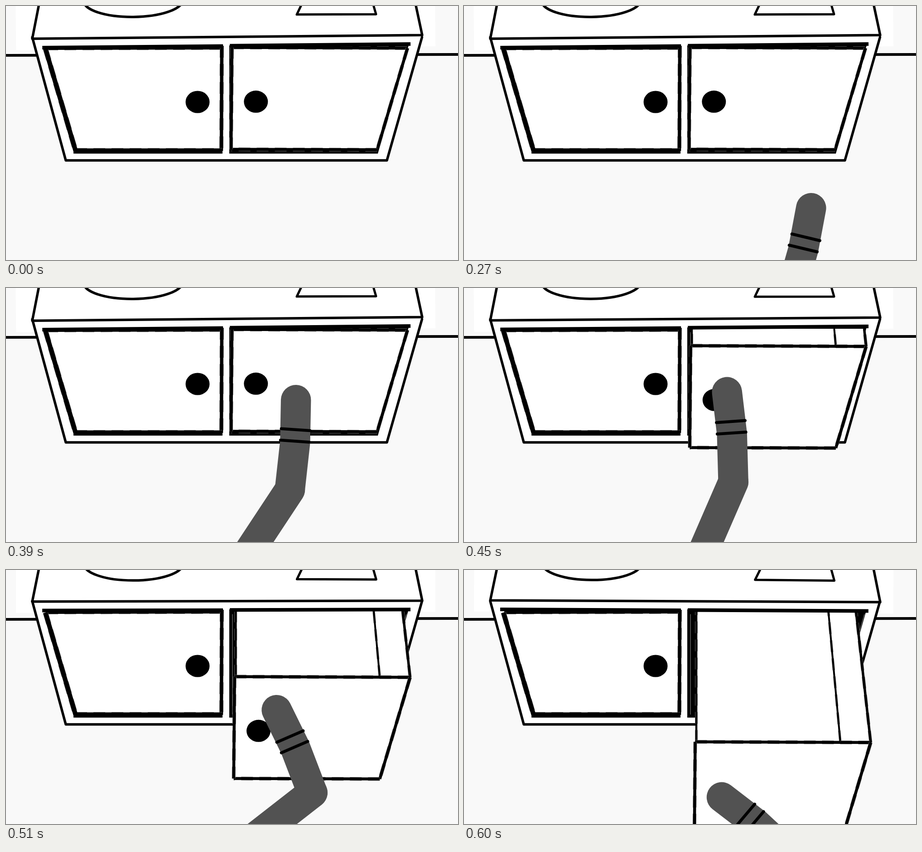
Write an HTML page with a canvas that moves like this. It is 998 px wide and 561 px high and loops after 1050 ms.

```html
<!DOCTYPE html>
<html lang="en">
<head>
<meta charset="utf-8">
<title>Opening a drawer</title>
<style>
html, body { margin: 0; width: 100%; height: 100%; overflow: hidden; background: #f9f9f9; }
canvas { display: block; }
</style>
</head>
<body>
<canvas id="stage" width="998" height="561"></canvas>
<script>
const ctx = document.getElementById('stage').getContext('2d');
const LOOP = 1050, STEP = 30, REACH = 210, GRAB = 420, END = 600;
const UPPER = 210, FORE = 199;

const rad = deg => deg * Math.PI / 180;
const mix = (a, b, s) => a + (b - a) * s;
const part = (t, from, to) => Math.min(1, Math.max(0, (t - from) / (to - from)));
// Soft start and stop, between linear and smoothstep
const ease = s => mix(s, s * s * (3 - 2 * s), 0.45);

// The arm reaches evenly, then swings back just after the drawer starts
function pose(t) {
  const reach = part(t, REACH, GRAB);
  const swing = lag => ease(part(t, GRAB + lag, END));
  return {
    upper: mix(mix(36, -72, reach), 2.6, swing(12)),
    tilt: mix(mix(18.2, 1.5, reach), -49.7, swing(4)),
    pull: swing(0)
  };
}

function trace(points) {
  ctx.beginPath();
  points.forEach(p => ctx.lineTo(...p));
}
function line(points, width, color = '#000') {
  trace(points);
  ctx.lineWidth = width;
  ctx.strokeStyle = color;
  ctx.stroke();
}
function fill(points, color) {
  trace(points);
  ctx.fillStyle = color;
  ctx.fill();
}
// Slightly ragged pen line
function pen(points, width) {
  ctx.lineCap = 'butt';
  ctx.setLineDash([26, 14]);
  line(points, width + 1.5, '#777');
  ctx.setLineDash([]);
  line(points, width);
  ctx.lineCap = 'round';
}
function bar(x1, x2, y) {
  ctx.lineCap = 'butt';
  line([[x1, y], [x2, y]], 8);
  ctx.lineCap = 'round';
}
function ellipse(x, y, rx, ry) {
  ctx.beginPath();
  ctx.ellipse(x, y, rx, ry, 0, 0, Math.PI * 2);
}
function knob(x, y) {
  ellipse(x, y, 26.5, 24.5);
  ctx.fillStyle = '#000';
  ctx.fill();
}

// The worktop tips a little as the drawer is pulled
function tilted(pull, draw) {
  ctx.save();
  ctx.translate(488, 68.3 + 0.7 * pull);
  ctx.rotate(rad(mix(-0.53, 0.27, pull)));
  ctx.translate(-488, -68);
  draw();
  ctx.restore();
}

function worktop() {
  const outline = [[76, -20], [58, 68], [919, 68], [901, -20]];
  fill(outline, '#fff');
  line(outline, 5.5);
  ellipse(281.5, -14, 109, 36);
  ctx.stroke();
  line([[662, -20], [642.5, 20], [817.5, 21], [806, -20]], 5);
  bar(80, 479, 88);
  bar(494, 893, 87.5);
}

function cabinet() {
  const outline = [[58, 69], [132, 341], [841, 341], [918.5, 69]];
  fill(outline, '#fff');
  line(outline, 5.5);
  pen([[89, 93.5], [476, 92.5]], 7);
  pen([[476.5, 88], [475.5, 320]], 7.5);
  pen([[153, 318.5], [477, 318.5]], 8);
  pen([[87, 94], [154, 321]], 10);
  bar(149, 478, 322);
  knob(423, 212);
}

function opening() {
  fill([[493, 87], [889, 87], [821, 326], [493, 326]], '#000');
  line([[500, 319], [500, 98]], 1, '#999');
  line([[884, 98], [872, 140]], 1, '#999');
}

function drawer(pull) {
  const dx = 11.5 * pull, dy = 288 * pull;
  const at = (x, y) => [x + dx, y + dy];
  const tl = at(499, 91.5), tr = at(886.5, 93);
  const br = at(819.5, 317.5), bl = at(497, 316.5);
  const back = ([x, y], slope) => [x - slope * (y - 90), 90];
  if (pull > 0) {
    const near = at(501.5, 91.5), seam = at(819.5, 92.5);
    fill([near, back(near, 0), back(tr, 0.112), tr], '#fff');
    pen([near, back(near, 0)], 4.5);
    pen([tr, back(tr, 0.112)], 5.5);
    pen([seam, back(seam, 0.0915)], 4);
  }
  fill([tl, tr, br, bl], '#fff');
  [[tl, tr], [tr, br], [br, bl], [bl, tl]].forEach(edge => pen(edge, 6.5));
  knob(...at(551.8, 211.3));
}

function arm(upper, tilt) {
  const skin = '#525252';
  ctx.save();
  ctx.translate(511, 621);
  ctx.rotate(rad(upper));
  line([[0, 0], [UPPER, 0]], 67, skin);
  ctx.translate(UPPER, 0);
  ctx.rotate(rad(tilt - upper));
  ctx.translate(0, -FORE);
  line([[0, 0], [4.5, 93], [0, FORE]], 66.5, skin);
  for (const y of [65.5, 91]) line([[-28, y], [35.5, y]], 6.5);
  ctx.restore();
}

function draw(now) {
  const t = Math.floor(now % LOOP / STEP) * STEP;
  const { upper, tilt, pull } = pose(t);
  ctx.lineCap = ctx.lineJoin = 'round';
  ctx.fillStyle = '#f9f9f9';
  ctx.fillRect(0, 0, 998, 561);
  tilted(pull, () => fill([[22, -20], [948, -20], [948, 93], [22, 93]], '#fff'));
  line([[0, 109], [998, 107]], 6);
  cabinet();
  opening();
  drawer(pull);
  tilted(pull, worktop);
  if (t >= REACH) arm(upper, tilt);
}

let begin;
function tick(now) {
  begin ??= now;
  draw(now - begin);
  requestAnimationFrame(tick);
}
draw(0);
requestAnimationFrame(tick);
</script>
</body>
</html>
```
